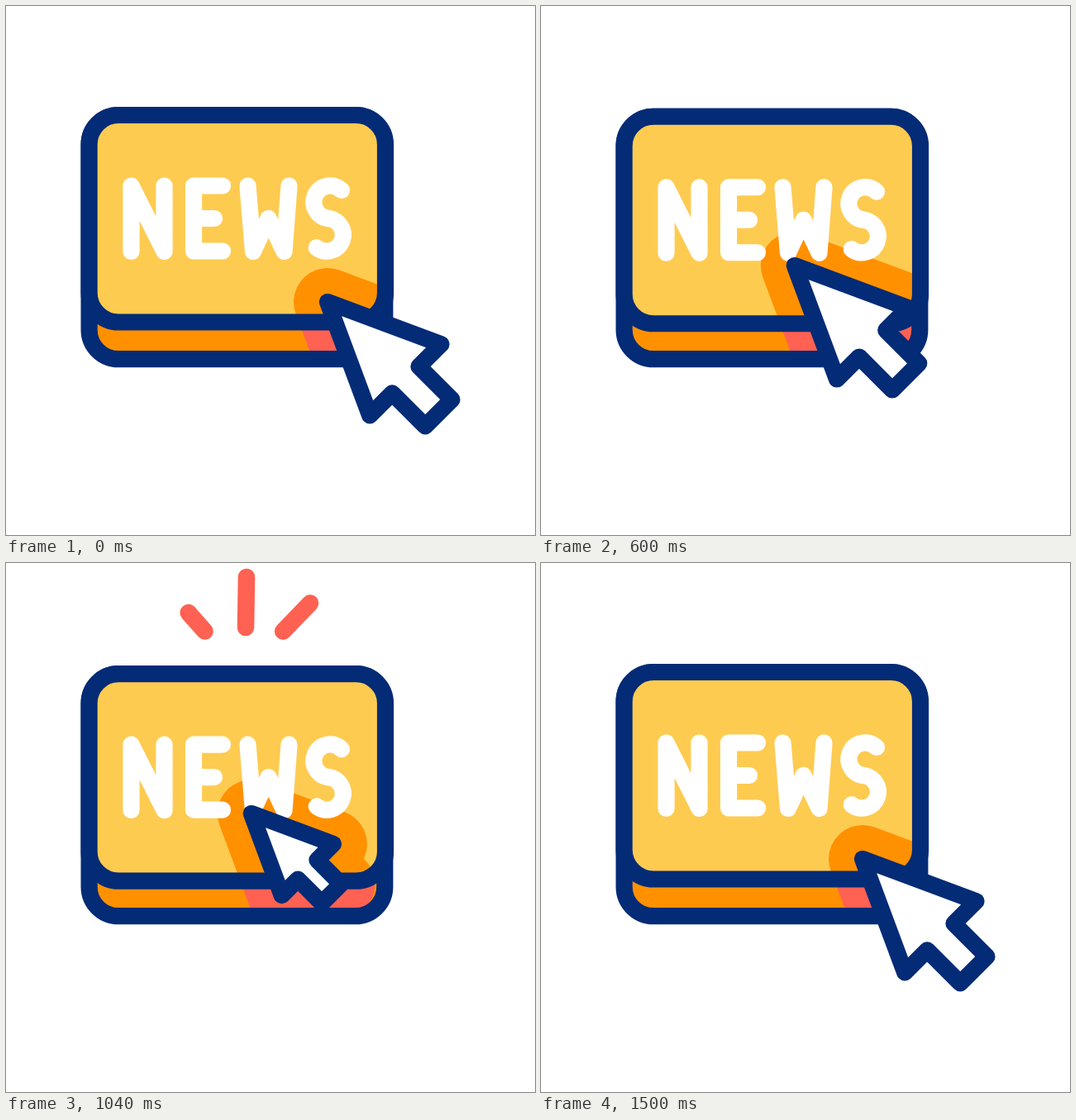
An HTML page with a canvas that plays this animation: 640x640 px, repeating every 2400 ms.

```html
<!DOCTYPE html>
<html lang="en">
<head>
<meta charset="utf-8">
<title>News button</title>
<style>
html, body { margin: 0; height: 100%; overflow: hidden; background: #fff; }
canvas { display: block; width: 100vmin; height: 100vmin; }
</style>
</head>
<body>
<canvas id="stage" width="640" height="640" role="img" aria-label="NEWS"></canvas>
<script>
const ctx = document.getElementById('stage').getContext('2d');
const LOOP = 2400;
const LINE = 20.2;
const NAVY = '#042b76', YELLOW = '#fecb51', ORANGE = '#ff9100', RED = '#ff6152', WHITE = '#fff';

// Single-stroke letters N, E, W, S
const WORD = new Path2D(
  'M151.5 297V217.5L191.5 297V217.5' +
  'M262 217.5H227V296.5H262M227 257H252' +
  'M292.5 217.5L299 297L317.5 257L336.5 297L342.5 217.5' +
  'M406 223A19.8 19.8 0 1 0 392 257H388A19.8 19.8 0 1 1 375.7 292.3'
);

// Progress from 0 to 1 with a soft start and end
function ease(t, start, end) {
  const u = Math.min(1, Math.max(0, (t - start) / (end - start)));
  return u * u * u * (10 + u * (6 * u - 15));
}

// Arrow mirrored about the diagonal that runs down-right from its tip
function arrowAt(x, y, scale) {
  const path = new Path2D();
  const neck = 133.4, tail = 190, wing = 61, stem = 22.8;
  const corner = (along, across) =>
    path.lineTo(x + (along + across) * scale * Math.SQRT1_2, y + (along - across) * scale * Math.SQRT1_2);
  corner(0, 0);
  corner(neck, wing);
  corner(neck, stem);
  corner(tail, stem);
  corner(tail, -stem);
  corner(neck, -stem);
  corner(neck, -wing);
  path.closePath();
  return path;
}

function box(right, top, bottom) {
  const left = 100.6;
  const path = new Path2D();
  path.roundRect(left, top, right - left, bottom - top, 35.5);
  return path;
}

function stroke(path, color, width = LINE) {
  ctx.strokeStyle = color;
  ctx.lineWidth = width;
  ctx.stroke(path);
}

function fill(path, color) {
  ctx.fillStyle = color;
  ctx.fill(path);
}

function drawPanel(path, color, arrow, shade) {
  fill(path, color);
  ctx.save();
  ctx.clip(path);
  fill(arrow, shade);
  stroke(arrow, shade, 82);
  ctx.restore();
  stroke(path, NAVY);
}

// A ray that grows from its base, then shrinks towards its outer end
function drawSpark(t, start, x, y, dx, dy) {
  const head = ease(t, start, start + 165);
  const tail = ease(t, start + 220, start + 390);
  if (t < start || tail >= 1) return;
  const ray = new Path2D();
  ray.moveTo(x + dx * tail, y + dy * tail);
  ray.lineTo(x + dx * head, y + dy * head + 0.01);
  stroke(ray, RED, 20.6);
}

function draw(t) {
  const back = ease(t, 915, 1500);
  const x = 389 + 70 * ease(t, 0, 325) - 169 * ease(t, 321, 691) + 99 * back;
  const y = 358 + 61 * ease(t, 0, 347) - 120 * ease(t, 332, 699) + 59 * back;
  const scale = 1 - 0.3 * (ease(t, 690, 930) - back);
  const press = 18.7 * ease(t, 530, 820) - 33.7 * ease(t, 820, 1264) + 15 * ease(t, 1264, 1500);
  const arrow = arrowAt(x, y, scale);

  ctx.fillStyle = WHITE;
  ctx.fillRect(0, 0, 640, 640);
  drawSpark(t, 780, 332, 86, 36, -37.5);
  drawSpark(t, 876, 290, 78, 1, -61);
  drawSpark(t, 960, 240.5, 82.5, -42, -47.5);

  drawPanel(box(458.3, 132 + press, 427.2), ORANGE, arrow, RED);
  drawPanel(box(459, 132 + press, 382.5 + press), YELLOW, arrow, ORANGE);

  ctx.save();
  ctx.translate(0, press);
  stroke(WORD, WHITE);
  ctx.restore();

  fill(arrow, WHITE);
  stroke(arrow, NAVY);
}

ctx.lineCap = ctx.lineJoin = 'round';
let origin;
function tick(now) {
  origin ??= now;
  draw((now - origin) % LOOP);
  requestAnimationFrame(tick);
}
draw(0);
requestAnimationFrame(tick);
</script>
</body>
</html>
```
